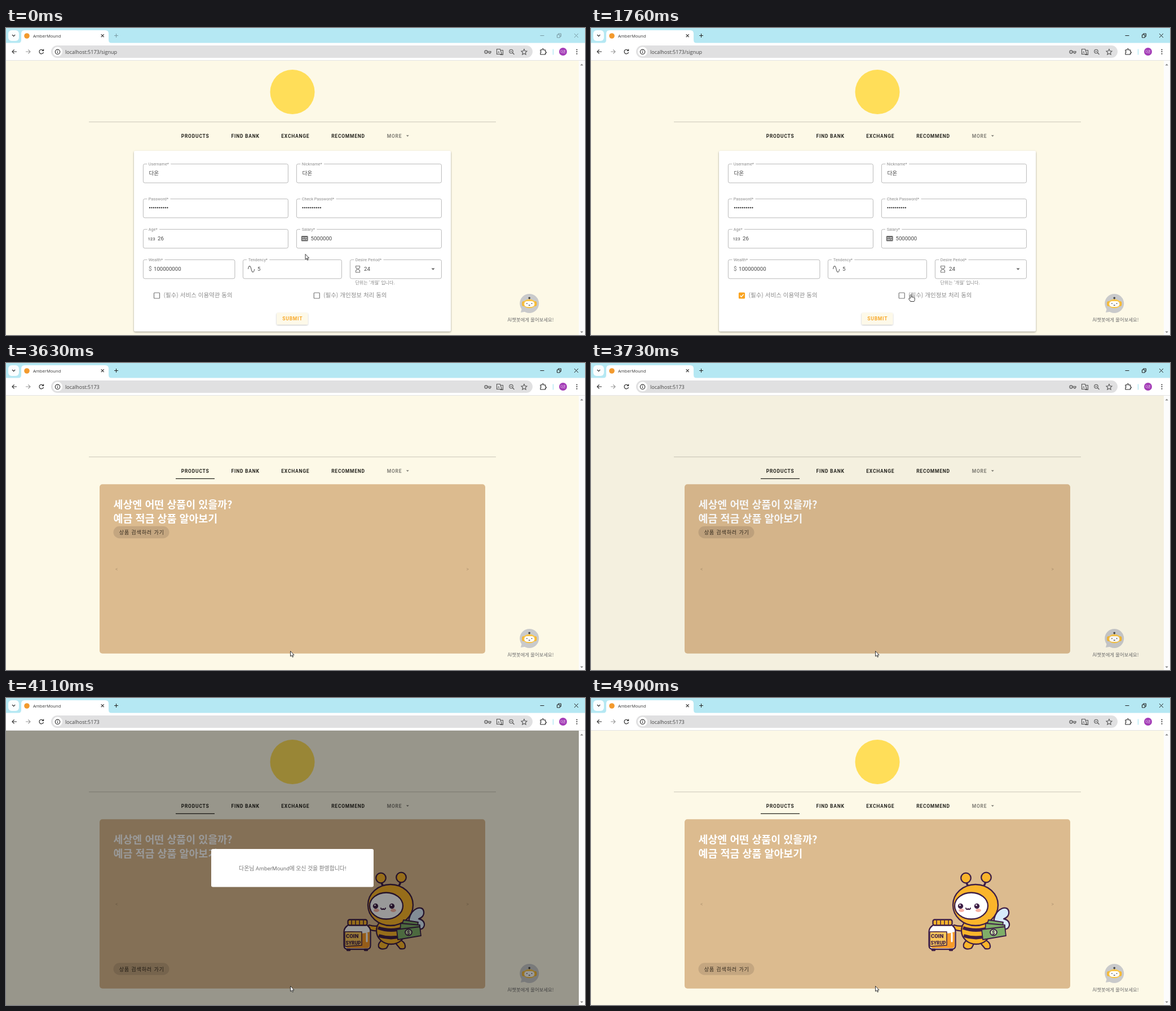
An HTML page for the animation above (5.48 s loop, 1027 by 545 pixels).

```html
<!DOCTYPE html>
<html lang="ko">
<head>
<meta charset="utf-8">
<title>Sign up</title>
<style>
html, body { margin: 0; width: 100%; height: 100%; overflow: hidden; background: #fdf9e7; }
svg { display: block; width: 100vw; height: 100vh; font-family: Roboto, "Noto Sans CJK KR", "Noto Sans CJK", sans-serif; }
.ui { font-family: "Open Sans", "Noto Sans", sans-serif; }
.ko { font-family: "Noto Sans CJK KR", "Noto Sans CJK", sans-serif; }
.line { fill: none; stroke: #333; stroke-width: 1.2; }
.nav { font-size: 8.5px; font-weight: 600; letter-spacing: .0892em; fill: #26251f; }
.label { font-size: 7.3px; fill: #8e8e8e; stroke: #fff; stroke-width: 6px; paint-order: stroke; }
.value { font-size: 9.6px; fill: #444; }
.ink { stroke: #3e1f47; stroke-width: 2.3; stroke-linejoin: round; stroke-linecap: round; }
.honey { fill: #fab52b; }
.grey { fill: none; stroke: #777; }
</style>
</head>
<body>
<svg viewBox="0 0 1027 545" preserveAspectRatio="none">
  <defs>
    <filter id="shadow" x="-10%" y="-10%" width="120%" height="125%">
      <feDropShadow dx="0" dy="1.5" stdDeviation="1.6" flood-opacity=".38"/>
    </filter>
    <filter id="lift" x="-10%" y="-20%" width="120%" height="150%">
      <feDropShadow dx="0" dy="1" stdDeviation="1" flood-opacity=".28"/>
    </filter>
  </defs>

  <!-- browser -->
  <rect width="1027" height="28" fill="#b5e8f3"/>
  <rect x="4" y="4" width="19" height="19" rx="6" fill="#fafeff"/>
  <path class="line" d="M11 12l2.600 2.600 2.600-2.600"/>
  <path d="M21 27q6 0 6-6V10q0-6 6-6h143q6 0 6 6v11q0 6 6 6z" fill="#fff"/>
  <circle cx="37" cy="14" r="4.8" fill="#f39a2d"/>
  <text class="ui" x="48" y="17.300" font-size="7.600" fill="#333">AmberMound</text>
  <path class="line" d="M168.700 11.200l5 5m0-5l-5 5"/>
  <path id="frame" class="line" style="stroke-width:1" d="M192 13.500h7m-3.500-3.500v7M947.500 13.500h7M977.500 12h5v5h-5zM979.500 12v-2h5v5h-2M1008 10l7 7m0-7l-7 7"/>
  <rect y="26.500" width="1027" height="31.500" fill="#fff"/>
  <path d="M0 57.500h1027" stroke="#e4e4e4"/>
  <rect x="80" y="31" width="854" height="22" rx="11" fill="#e0e0e1"/>
  <circle cx="91.500" cy="42" r="8.500" fill="#fff"/>
  <path class="line" d="M19 42h-8m3.600-3.600L11 42l3.600 3.600"/>
  <path class="line" style="stroke:#999" d="M35 42h8m-3.600-3.600L43 42l-3.600 3.600"/>
  <path class="line" d="M66 40a3.800 3.800 0 1 0 .5 3M66.600 37.500v3h-3"/>
  <circle class="line" cx="91.500" cy="42.300" r="4.200"/>
  <path class="line" d="M91.500 41.800v2.800m0-4.800v1"/>
  <text id="url" class="ui" x="105" y="45.800" font-size="9" fill="#444"></text>
  <g class="line" style="stroke:#555;stroke-width:1.1">
    <circle cx="851.500" cy="42.500" r="2.600"/><path d="M854 41.500h6v2h-1v1.500h-2v-1.500h-3M851 42.500h1"/>
    <path d="M870.500 37.500h6l3 9h-9zM877.500 39.500h4v8h-5"/>
    <circle cx="896" cy="41.500" r="3.200"/><path d="M898.500 44l3 3M894.500 41.500h3"/>
    <path d="M919 37.500l1.500 3.300 3.500.4-2.600 2.400.7 3.500-3.100-1.800-3.100 1.800.7-3.500-2.600-2.400 3.500-.4z"/>
    <path style="stroke:#222" d="M948 39h3v-1a1.300 1.300 0 0 1 2.600 0v1h3v3h.5a1.300 1.300 0 0 1 0 2.600h-.5v2.400h-8.600v-3a1.600 1.600 0 0 0 0-3z"/>
  </g>
  <text x="872" y="44.500" font-size="5.500" fill="#444">A</text>
  <path d="M970.500 37.500v10" stroke="#b5e8f3" stroke-width="1.500"/>
  <circle cx="988" cy="42" r="7" fill="#a33bb6"/>
  <text class="ko" x="988" y="44" font-size="5.200" fill="#fff" text-anchor="middle">다온</text>
  <path d="M1012.500 38.500v8" stroke="#222" stroke-width="2" stroke-linecap="round" stroke-dasharray="0 3.600"/>

  <!-- page -->
  <rect y="58" width="1016" height="487" fill="#fdf9e7"/>
  <rect x="1016" y="58" width="11" height="487" fill="#fcfcfc"/>
  <path d="M1018.500 66.500l2.700-3 2.700 3zM1018.500 538.500l2.700 3 2.700-3z" fill="#8a8a8a"/>
  <circle id="logo" cx="508" cy="113.500" r="39.500" fill="#ffde59"/>
  <path d="M147 166.800h722" stroke="#c9c6b8" stroke-width="1.100"/>
  <g class="nav">
    <text x="310.700" y="194.500">PRODUCTS</text>
    <text x="399.500" y="194.500">FIND BANK</text>
    <text x="488.300" y="194.500">EXCHANGE</text>
    <text x="577.200" y="194.500">RECOMMEND</text>
    <text x="675.700" y="194.500" fill="#817f76">MORE</text>
  </g>
  <path d="M709.800 190.300h5l-2.500 2.600z" fill="#817f76"/>

  <g id="signup">
    <rect x="227" y="218" width="562" height="320.500" rx="2.500" fill="#fff" filter="url(#shadow)"/>
    <g id="fields"></g>
    <g stroke="#444" stroke-width="2.500" stroke-linecap="round" stroke-dasharray="0 3.480">
      <path d="M255 319h32M526.500 319h32"/>
    </g>
    <text x="251.500" y="377" font-size="7.600" font-weight="700" fill="#777">123</text>
    <rect x="523.700" y="369" width="12" height="9.600" rx="1.500" fill="#707070"/>
    <path d="M525.500 372.500h3m1 0h4.500M525.500 375.500h5m1 0h2.500" stroke="#fff"/>
    <text x="253" y="431" font-size="10" fill="#777">$</text>
    <path class="grey" stroke-width="1.300" d="M429.500 428c1-7 4-7 5.500 0s4.500 7 5.800 0"/>
    <path class="grey" stroke-width="1.100" d="M620.500 422.500h7v3l-3 2.500 3 2.500v3.200h-7v-3.200l3-2.500-3-2.500z"/>
    <path d="M754.500 426.500h6l-3 3.200z" fill="#666"/>
    <text class="ko" x="619.500" y="455" font-size="8" fill="#888">단위는 '개월' 입니다.</text>
    <g id="boxes"></g>
    <g class="ko" font-size="10.500" fill="#8a8a8a">
      <text x="279.500" y="477.700">(필수) 서비스 이용약관 동의</text>
      <text x="563" y="477.700">(필수) 개인정보 처리 동의</text>
    </g>
    <rect x="480" y="505.500" width="55.500" height="21" rx="2" fill="#fdf9e9" filter="url(#lift)"/>
    <rect id="press" x="480" y="505.500" width="55.500" height="21" rx="2" fill="#faa31e"/>
    <text class="nav" style="fill:#f8a829" x="490.300" y="519">SUBMIT</text>
  </g>

  <g id="home">
    <path d="M301 205.300h69" stroke="#26251f" stroke-width="1.300"/>
    <rect x="166" y="215.300" width="684" height="300.500" rx="5" fill="#dcbb8f"/>
    <g class="ko" font-size="18.400" font-weight="700" fill="#fff">
      <text x="190.500" y="257.500">세상엔 어떤 상품이 있을까?</text>
      <text x="190.500" y="282.500">예금 적금 상품 알아보기</text>
    </g>
    <text x="194" y="369" font-size="8.500" fill="#b09572">&lt;</text>
    <text x="816.500" y="369" font-size="8.500" fill="#b09572">&gt;</text>
    <g id="search">
      <rect x="190.500" y="-10.700" width="99" height="21.400" rx="10.700" fill="#c4a680"/>
      <text class="ko" x="200.700" y="3.500" font-size="9.100" font-weight="500" letter-spacing=".8" fill="#33291c">상품 검색하러 가기</text>
    </g>
    <g id="bee" class="ink">
      <path fill="none" stroke-width="3.500" d="M666 328q2 6 6 9M700 327q-2 6-6 10"/>
      <circle class="honey" cx="665" cy="319.500" r="8.800"/>
      <circle class="honey" cx="701" cy="318.500" r="8.800"/>
      <path d="M715 392c5-20 24-25 26-13 1 8-5 12-9 13 10 2 13 11 7 17-8 5-18-3-24-11z" fill="#d8ebfa"/>
      <path class="honey" d="M665 404q-13 2-21-1-4 4 1 8 8 4 19 1z"/>
      <path class="honey" d="M668 429q-9 6-7 13 4 6 14 2l6-11zM690 434l9 11q10 2 9-5 0-7-10-11z"/>
      <ellipse class="honey" cx="683" cy="413" rx="26" ry="24"/>
      <path fill="none" stroke-width="6" stroke-linecap="butt" d="M660 408q23 8 46 0M661 422q22 7 44 0"/>
      <ellipse class="honey" cx="682" cy="367.500" rx="40" ry="36.500"/>
      <ellipse cx="674.500" cy="369" rx="29.500" ry="23.500" fill="#fff"/>
      <g stroke="none">
        <ellipse cx="657" cy="377" rx="5" ry="3" fill="#f8b3a5"/><ellipse cx="687" cy="377" rx="5" ry="3" fill="#f8b3a5"/>
        <circle cx="655.500" cy="369.500" r="4.700" fill="#3e1f47"/><circle cx="684.500" cy="369.500" r="4.700" fill="#3e1f47"/>
        <circle cx="654.500" cy="367.800" r="1.400" fill="#fff"/><circle cx="683.500" cy="367.800" r="1.400" fill="#fff"/>
      </g>
      <path fill="none" stroke-width="2" d="M665 373q1 4 4 1 3 3 4-1"/>
      <g fill="#7fae68" stroke-width="1.800">
        <path d="M705 394l26 4-2 14-28-4z"/><path d="M700 400l34 3 1 15-36-2z"/><path d="M693 411l41-5 2 16-41 7z"/>
        <ellipse cx="714" cy="416" rx="6" ry="5.500" fill="#c9dfad"/>
      </g>
      <text x="711.200" y="419.500" font-size="9" font-weight="700" stroke="none" fill="#3e1f47">$</text>
      <path d="M607 403h33q7 5 6.500 12v24q0 7-7 7h-33q-7 0-7-7v-24q0-7 7.500-12z" fill="#fff"/>
      <path d="M602 416q10-4 21 0t22-1v24q0 5-5 5h-33q-5 0-5-5z" fill="#f79a2b" stroke="none"/>
      <path d="M601 415h30v24l-30 2z" fill="#fbc75b" stroke-width="1.500"/>
      <path d="M640 418v14" stroke="#fff" stroke-width="3"/>
      <rect class="honey" x="606.500" y="393.500" width="34" height="10" rx="3"/>
      <path fill="none" stroke-width="1.500" d="M613 395v7m7-7v7m7-7v7m7-7v7"/>
      <path class="honey" d="M605 446h5v2h-5zM636 446h5v2h-5z"/>
      <g font-weight="900" font-size="9.500" fill="#3e1f47" stroke="none">
        <text x="603" y="426">COIN</text><text x="602.500" y="438" font-size="8.400">SYRUP</text>
      </g>
    </g>
  </g>

  <g id="bot">
    <path d="M916 494l-3 11 12-2z" fill="#c9cacb"/>
    <circle cx="928.300" cy="489" r="17" fill="#c9cacb"/>
    <path d="M928.300 479v4" stroke="#444"/><circle cx="928.300" cy="479.300" r="1.800" fill="#444"/>
    <rect x="915.300" y="485" width="26" height="9" rx="3" fill="#f5b62f"/>
    <ellipse cx="928.300" cy="489.500" rx="11" ry="8" fill="#f9c64a"/>
    <rect x="919.300" y="485" width="18" height="10" rx="5" fill="#fff"/>
    <path d="M924 488.300v1.800m8.600-1.800v1.800M927 491.800q1.300 1 2.600 0" stroke="#444" stroke-width="1.300" fill="none"/>
    <text class="ko" x="889.800" y="520.700" font-size="8.350" fill="#6f6f6f">AI챗봇에게 물어보세요!</text>
  </g>

  <rect id="dim" y="58" width="1016" height="487"/>
  <g id="dialog">
    <rect x="364" y="268" width="288" height="67.500" rx="3" fill="#fff"/>
    <text x="508.300" y="306.200" font-size="9.900" fill="#777" text-anchor="middle">다온님 AmberMound에 오신 것을 환영합니다!</text>
  </g>

  <path id="arrow" d="M.5.5v9.300l2.100-1.900 1.500 3.300 1.500-.7-1.500-3.200h2.900z" fill="#fff" stroke="#222" stroke-width=".9"/>
  <path id="hand" d="M-1.300 7V1.200q1.200-1.600 2.400 0V5q1.500-.8 2 .3 1.400-.6 1.900.4 1.500-.3 1.700 1v3q-.2 1.600-1.200 2.800H-.8Q-2.500 9.700-4 8q.4-1.900 2.700-1z" fill="#fff" stroke="#222" stroke-width=".9"/>
</svg>
<script>
const $ = id => document.getElementById(id);
const LOOP = 5480;

const fields = [
  [243, 241, 257, "Username*", "다온", 10.5], [515, 241, 257, "Nickname*", "다온", 10.5],
  [243, 303, 257, "Password*"], [515, 303, 257, "Check Password*"],
  [243, 357, 257, "Age*", "26", 26], [515, 357, 257, "Salary*", "5000000", 25.5],
  [243, 411, 162.5, "Wealth*", "100000000", 19], [420, 411, 175, "Tendency*", "5", 26],
  [610, 411, 162, "Desire Period*", "24", 25]
];
$("fields").innerHTML = fields.map(([x, y, w, label, value = "", dx = 0]) =>
  `<rect x="${x + .4}" y="${y + .4}" width="${w}" height="33.5" rx="2.800" fill="none" stroke-width=".9"/>
   <text class="label" x="${x + 9.7}" y="${y + 3}">${label}</text>
   <text class="value" x="${x + dx}" y="${y + 19.8}">${value}</text>`).join("");
const outlines = document.querySelectorAll("#fields rect");

const boxes = [{ x: 267.5, click: 770 }, { x: 551.2, click: 1860 }];
$("boxes").innerHTML = boxes.map(b => `<g transform="translate(${b.x} 475)">
  <circle fill="#faa31e"/><rect x="-5" y="-5" width="10" height="10" rx="1" stroke-width="1.200"/>
  <path d="M-3 0l2.200 2.300 4-4.500" fill="none" stroke="#fff" stroke-width="1.400"/></g>`).join("");

// the screen is refreshed in bursts: [first, last, count]
const bursts = [[200, 680, 6], [770, 1270, 6], [1360, 1560, 3], [1760, 2260, 6], [2360, 2850, 6],
  [2940, 3140, 3], [3340, 3340, 1], [3630, 4110, 6], [4700, 4900, 3]];
const ticks = [0];
for (const [a, b, n] of bursts)
  for (let i = 0; i < n; i++) ticks.push(n > 1 ? Math.round(a + (b - a) * i / (n - 1)) : a);

const path = [[0, 530.5, 401], [100, 530.5, 401], [200, 520, 412], [300, 470, 434], [400, 400, 455], [490, 330, 464],
  [590, 280, 468], [680, 267, 468], [1270, 267, 469], [1360, 330, 470], [1460, 470, 472], [1560, 577, 473],
  [1760, 567.5, 473], [1860, 552, 470], [2260, 551, 470], [2360, 546, 476], [2850, 508.5, 512], [3330, 508.5, 512],
  [3340, 504, 511], [LOOP, 504, 511]];

const clamp = v => Math.min(1, Math.max(0, v));
const smooth = v => (v = clamp(v), v * v * (3 - 2 * v));
const show = (id, on) => $(id).style.display = on ? "" : "none";

function pointer(t) {
  const i = path.findIndex(p => p[0] > t);
  const [t0, x0, y0] = path[i - 1], [t1, x1, y1] = path[i];
  const k = (t - t0) / (t1 - t0);
  return [x0 + (x1 - x0) * k, y0 + (y1 - y0) * k];
}

function draw(t) {
  const [x, y] = pointer(t);
  const home = t >= 3630, loaded = t >= 3830;

  $("frame").style.stroke = t < 770 ? "#7899a2" : "#222";
  $("url").textContent = "localhost:5173" + (home ? "" : "/signup");
  show("signup", !home);
  show("home", home);
  show("logo", !home || loaded);
  show("bee", loaded);
  $("search").setAttribute("transform", `translate(0 ${loaded ? 481 : 300.5})`);

  fields.forEach(([fx, fy, w], i) => {
    const over = x > fx && x < fx + w && y > fy && y < fy + 34;
    outlines[i].setAttribute("stroke", over ? "#444" : "#b2b2b2");
  });

  boxes.forEach((b, i) => {
    const [ring, box, tick] = $("boxes").children[i].children;
    const on = t >= b.click + 90, p = (t - b.click) / 500;
    const over = Math.abs(x - b.x) < 12 && Math.abs(y - 472) < 12;
    ring.setAttribute("r", 13);
    ring.style.opacity = (over ? .07 : 0) + (p >= 0 && p < 1 ? .2 * (1 - p) : 0);
    box.setAttribute("fill", on ? "#faa31e" : "#fff");
    box.setAttribute("stroke", on ? "#faa31e" : "#777");
    tick.style.display = on ? "" : "none";
  });

  const onButton = x > 480 && x < 536 && y > 505;
  $("press").style.opacity = t >= 2940 ? .28 - .16 * clamp((t - 2940) / 200) : onButton ? .1 : 0;

  $("dim").style.opacity = .4 * (smooth((t - 3690) / 200) - smooth((t - 4620) / 200));
  const enter = clamp((t - 3740) / 100), leave = clamp((4731 - t) / 82);
  const s = .9 + .1 * enter;
  $("dialog").style.opacity = enter * leave;
  $("dialog").setAttribute("transform", `translate(508 302) scale(${s}) translate(-508 -302)`);

  const onLabel = y > 462 && y < 488 && (x < 401 || x > 545);
  const hand = t < 3340 && (onLabel || onButton);
  show("hand", hand);
  show("arrow", !hand);
  $(hand ? "hand" : "arrow").setAttribute("transform", `translate(${x} ${y})`);
}

function loop() {
  const now = performance.now() % LOOP;
  draw(ticks.findLast(k => k <= now));
  requestAnimationFrame(loop);
}
loop();
</script>
</body>
</html>
```
